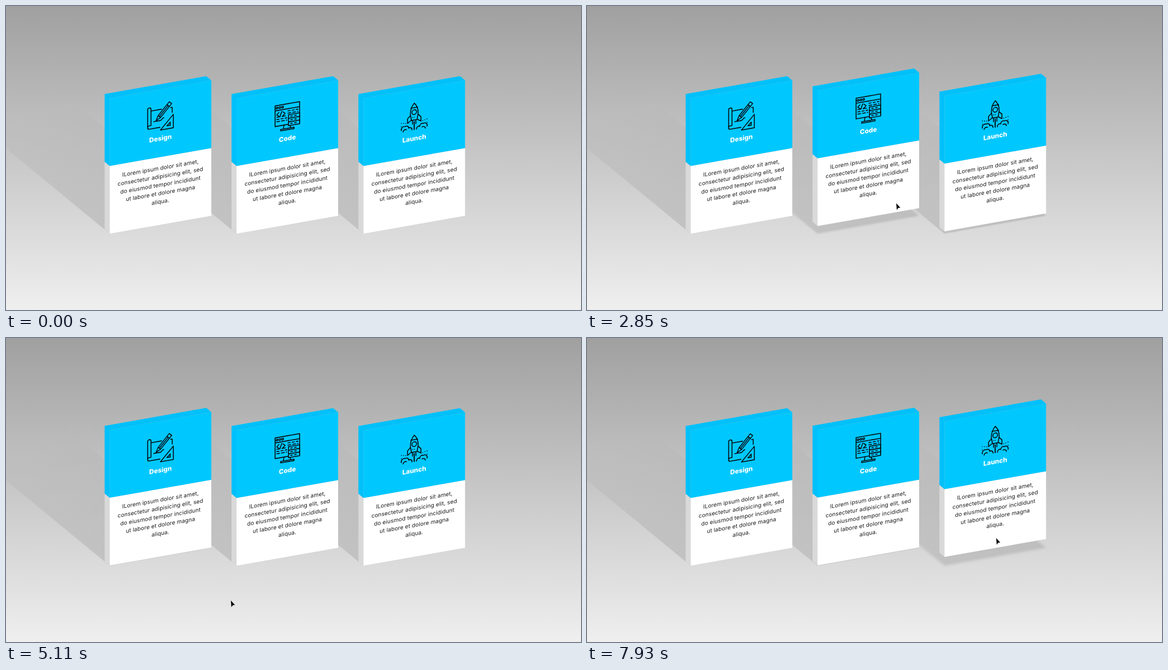
These frames come from a looping animation (1030x544 px, 8000 ms). An HTML page:

```html
<!DOCTYPE html>
<html lang="en">
<head>
<meta charset="utf-8">
<title>Isometric cards</title>
<style>
  html, body { margin: 0; width: 100%; height: 100%; overflow: hidden; }
  svg { display: block; width: 1030px; height: 544px; background: linear-gradient(#a0a0a0, #efefef); }
  text { font-family: Inter, "Open Sans", sans-serif; text-anchor: middle; }
  .title { font-size: 11.7px; font-weight: 800; fill: #fff; }
  .copy { font-size: 10px; letter-spacing: .12px; fill: #1a1a1a; }
  .icon { fill: none; stroke: #06090c; stroke-width: 1.6; stroke-linecap: round; stroke-linejoin: round; }
  .panel { fill: #00c8ff; }
  .edge { fill: #00c0fa; }
</style>
</head>
<body>
<svg viewBox="0 0 1030 544">
  <linearGradient id="fade" x1="0" y1="1" x2="0" y2="0">
    <stop offset="0" stop-opacity=".115"/>
    <stop offset="1" stop-opacity="0"/>
  </linearGradient>
  <g id="shadows"></g>
  <g id="cards"></g>
  <g id="cursor">
    <path id="arrow" d="M0 0L7.3 8 3.6 8.3 1 12z"/>
    <path id="beam" d="M-2-5h4M-2 5h4M0-5v10" stroke="#222" stroke-width=".9"/>
  </g>
</svg>
<script>
const LOOP = 8000, FADE = 500, LIFT = 24, BLUR = 3;
const W = 182, H = 242.5, MID = H / 2, DEPTH = 9;
const LEFT = 185.7, TOP = 165, PITCH = 227.3, LINE = 15;
const SKEW = Math.tan(Math.PI / 18);
const COPY = ["ILorem ipsum dolor sit amet,", "consectetur adipisicing elit, sed",
  "do eiusmod tempor incididunt", "ut labore et dolore magna", "aliqua."];

const $ = id => document.getElementById(id);
const repeat = (n, make) => Array.from({ length: n }, (_, i) => make(i)).join("");
const stroke = (d, attrs = "") => `<path d="${d}" ${attrs}/>`;

// Icons are drawn in a 48 unit square
function designIcon() {
  return stroke("M1 41V9a3 3 0 0 1 6 0v29H4a3 3 0 0 0 0 6h19M7 12h19M42 12h3v9M12 32h11c4 0 3-4 7-4") +
    stroke("M0 0l9-3h29v6H9zM9-3v6M32-3v6M9 0h23", 'transform="translate(16 31) rotate(-47)"') +
    stroke("M47 25v24H24zM41.5 38v5.5h-6z");
}

function codeIcon() {
  const dots = repeat(3, i => `<circle cx="${5.5 + 5 * i}" cy="6.5" r="1.6"/>`);
  const rows = repeat(5, i => stroke(`M${i < 2 ? 25 : 5} ${15 + 4 * i}h18`,
    `stroke-dasharray="${4 + i % 3} 3.5"`));
  const servers = repeat(3, i => stroke(`M26 ${22 + 6.5 * i}h20v6.500h-20z`, 'class="panel"') +
    stroke(`M30 ${25.2 + 6.5 * i}h12`, 'stroke-dasharray="3 4"'));
  return stroke("M2 2h44v37H2zM2 11h44M9 15l-4 3.500 4 3.500M14 14l-3 8M16 15l4 3.500-4 3.500") +
    dots + rows + servers + stroke("M18 39l-1 6M29 42l1 3M12 46h24v2.500H12z");
}

function launchIcon() {
  const half = stroke("M24 1c-5 5-7 11-7 19l2 11h5M18 9h6M17 22l-5 5v8l6-4M21 32v6M24 34v14") +
    stroke("M1 46a5 5 0 0 1 7-6a4 4 0 0 1 6 4a4 4 0 0 1 6 4M4 49a4 4 0 0 1 6-3") +
    stroke("M1 33l9 2M1 39h3", 'stroke-dasharray="0 4"');
  return half + `<g transform="matrix(-1 0 0 1 48 0)">${half}</g><circle cx="24" cy="17" r="4.200"/>` +
    stroke("M21 26h6", 'stroke-dasharray="0 3"');
}

// Hover spans as [enter, leave] in ms
const cards = [
  { icon: designIcon, title: "Design", spans: [[3735, 4700], [5330, 6150]] },
  { icon: codeIcon, title: "Code", spans: [[2685, 3675], [6620, 7535]] },
  { icon: launchIcon, title: "Launch", spans: [[1540, 2592], [7740, LOOP]] }
];

// Key points of the pointer as [ms, x, y]
const path = [
  [820, 977, 322], [1800, 774, 304], [2420, 774, 304], [2850, 554, 353],
  [3300, 528, 341], [3480, 528, 341], [3950, 278, 284], [4620, 278, 284],
  [5110, 403, 470], [5600, 310, 345], [6050, 310, 345], [6400, 455, 513],
  [6900, 510, 350], [7535, 595, 352], [LOOP, 757, 359]
];

// Same curve as the CSS "ease" keyword
function ease(x) {
  if (x <= 0) return 0;
  if (x >= 1) return 1;
  const bez = (a, b, u) => 3 * a * u * (1 - u) ** 2 + 3 * b * u * u * (1 - u) + u ** 3;
  let lo = 0, hi = 1;
  for (let i = 0; i < 24; i++) {
    const u = (lo + hi) / 2;
    if (bez(.25, .25, u) < x) lo = u; else hi = u;
  }
  return bez(.1, 1, lo);
}

const raised = (spans, t) => spans.reduce(
  (sum, [on, off]) => sum + ease((t - on) / FADE) - ease((t - off) / FADE), 0);

function pointer(t) {
  const i = path.findIndex(p => p[0] > t);
  const [t0, x0, y0] = path[i - 1], [t1, x1, y1] = path[i];
  const k = (t - t0) / (t1 - t0);
  return [x0 + (x1 - x0) * k, y0 + (y1 - y0) * k];
}

// True where the point lies on a card's paragraph
function overCopy(card, [px, py]) {
  const x = px - card.x, y = py - card.y + SKEW * x;
  return x > 14 && x < W - 14 && y > 134 && y < 134 + LINE * COPY.length;
}

const skewed = (x, y) => `matrix(1 ${-SKEW} 0 1 ${x} ${y})`;

function add(parent, tag, attrs, content = "") {
  const el = document.createElementNS("http://www.w3.org/2000/svg", tag);
  for (const k in attrs) el.setAttribute(k, attrs[k]);
  el.innerHTML = content;
  return parent.appendChild(el);
}

cards.forEach((card, i) => {
  card.x = LEFT + PITCH * i;
  const floor = add($("shadows"), "g", { transform: skewed(card.x, TOP) });
  card.shadow = add(floor, "path", { d: `M0 ${H}H${W}L${W - H} 0H${-H}z`, fill: "url(#fade)" });
  const lines = repeat(COPY.length, n =>
    `<text class="copy" x="${W / 2}" y="${144.5 + LINE * n}">${COPY[n]}</text>`);
  card.el = add($("cards"), "g", {}, `
    <path d="M0 ${MID}l${-DEPTH} ${-DEPTH}V${H - DEPTH}L0 ${H}z" fill="#d9d9d9"/>
    <path class="edge" d="M0 ${MID}l${-DEPTH} ${-DEPTH}V${-DEPTH}H${W - DEPTH}L${W} 0H0z"/>
    <rect y="${MID}" width="${W}" height="${H - MID}" fill="#fff"/>
    <rect class="panel" width="${W}" height="${MID}"/>
    <g class="icon" transform="translate(67 24)">${card.icon()}</g>
    <text class="title" x="${W / 2}" y="92">${card.title}</text>${lines}`);
});

function draw(t) {
  for (const c of cards) {
    const p = raised(c.spans, t);
    c.y = TOP - LIFT * p;
    c.el.setAttribute("transform", skewed(c.x, c.y));
    c.shadow.style.filter = p > .005 ? `blur(${BLUR * p}px)` : "none";
  }
  const shown = t >= path[0][0];
  $("cursor").style.display = shown ? "" : "none";
  if (!shown) return;
  const at = pointer(t);
  const beam = cards.some(c => overCopy(c, at));
  $("cursor").setAttribute("transform", `translate(${at})`);
  $("beam").style.display = beam ? "" : "none";
  $("arrow").style.display = beam ? "none" : "";
}

const start = performance.now();
function tick() {
  draw((performance.now() - start) % LOOP);
  requestAnimationFrame(tick);
}
tick();
</script>
</body>
</html>
```
